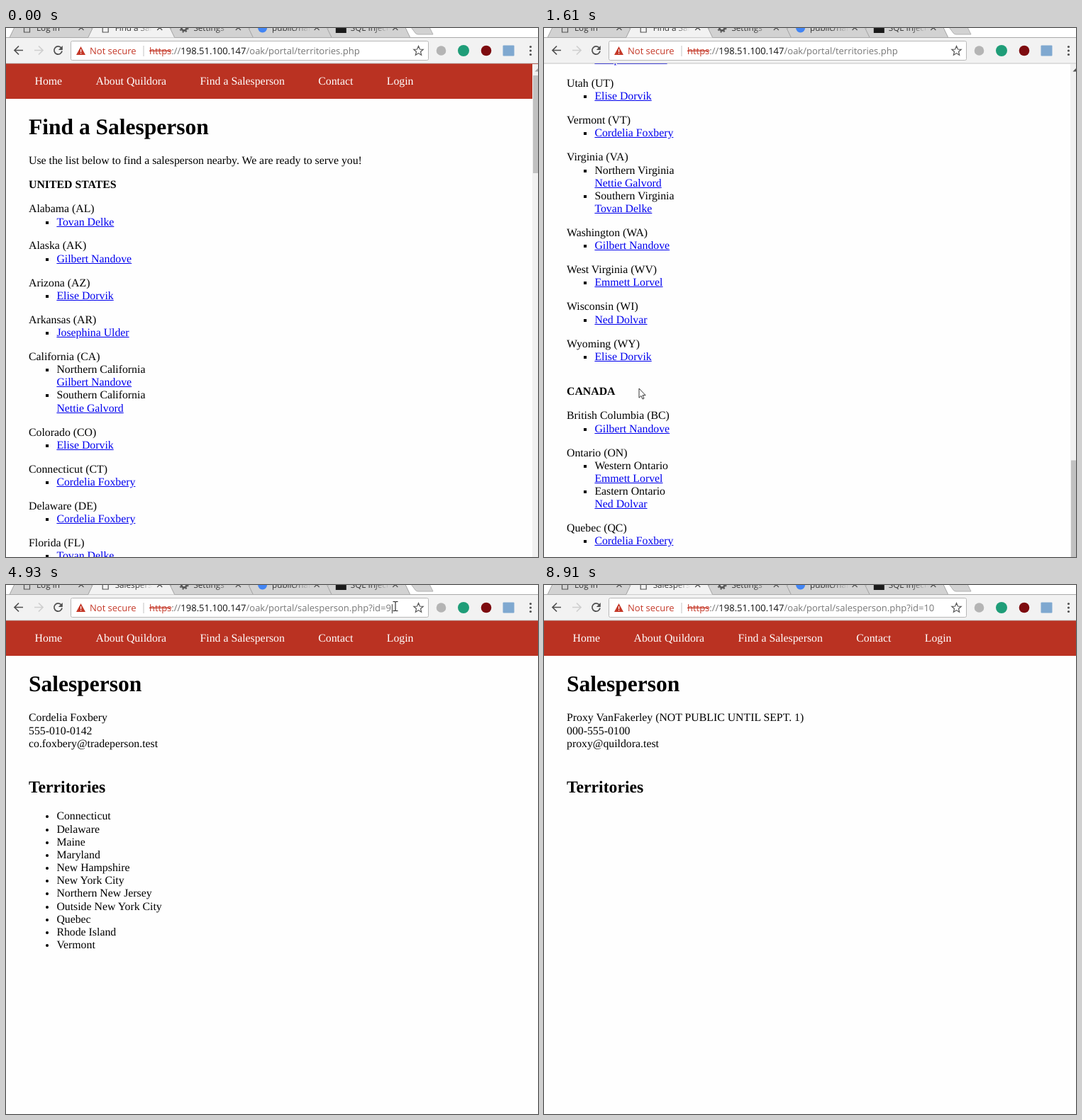
These frames come from a looping animation (750 by 747 pixels, 9310 ms). An HTML page:

```html
<!DOCTYPE html>
<html lang="en">
<head>
<meta charset="utf-8">
<title>Find a Salesperson</title>
<style>
  html, body { margin: 0; width: 100%; height: 100%; overflow: hidden; }
  body { background: #fefefe; text-rendering: geometricPrecision; }
  #view { position: absolute; top: 50px; left: 0; width: 750px; height: 697px; overflow: hidden;
          font: 15.8px/18.17px "Liberation Serif", serif; color: #000; }
  nav { display: flex; gap: 47.4px; height: 50px; padding-left: 40.5px; background: #ba3222;
        color: #fff; line-height: 52px; white-space: nowrap; }
  main { padding-left: 32px; }
  h1 { font-size: 31.5px; line-height: 36px; margin: 22px 0 21.4px; }
  h2 { font-size: 23.67px; line-height: 28px; margin: 37.6px 0 18.9px; }
  p { margin: 0 0 15.8px; }
  ul { margin: 0; padding-left: 39.4px; }
  .state { margin-bottom: 15.8px; }
  .state ul { list-style: square; }
  .canada { margin-top: 31.6px; }
  u { color: #00e; }
  svg { position: absolute; left: 0; top: 0; }
  svg text { font: 13px "Open Sans", sans-serif; white-space: pre; }
  svg .tab { font-size: 11.7px; fill: #333; }
  svg .bold { font-weight: 600; }
</style>
</head>
<body>
<div id="view"></div>
<svg id="overlay" width="750" height="747" viewBox="0 0 750 747"></svg>
<script>
const LOOP = 9310;
const HOST = '198.51.100.147', FOLDER = '/oak/portal/';
const BRAND = 'Quildora', SECRET = 'Proxy VanFakerley';
const PEOPLE = {
  T: 'Tovan Delke', G: 'Gilbert Nandove', E: 'Elise Dorvik', J: 'Josephina Ulder', N: 'Nettie Galvord',
  C: 'Cordelia Foxbery', P: 'Pam Ulveny', L: 'Emmett Lorvel', K: 'Ned Dolvar'
};
// name/code/territories; a territory is "place=people" or just people
const STATES = `Alabama/AL/T|Alaska/AK/G|Arizona/AZ/E|Arkansas/AR/J|California/CA/Northern California=G+Southern California=N
|Colorado/CO/E|Connecticut/CT/C|Delaware/DE/C|Florida/FL/T|Georgia/GA/T|Hawaii/HI/G|Idaho/ID/G
|Illinois/IL/Chicago=L+Outside Chicago=K|Indiana/IN/L|Iowa/IA/P|Kansas/KS/J|Kentucky/KY/L|Louisiana/LA/J|Maine/ME/C
|Maryland/MD/C|Massachusetts/MA/N|Michigan/MI/Western Michigan=K+Eastern Michigan=L|Minnesota/MN/P|Mississippi/MS/T
|Missouri/MO/J|Montana/MT/P|Nebraska/NE/P|Nevada/NV/Las Vegas=N+Outside Las Vegas=E|New Hampshire/NH/C
|New Jersey/NJ/Northern New Jersey=C+Southern New Jersey=N|New Mexico/NM/E
|New York/NY/New York City=CN+Outside New York City=C|North Carolina/NC/T|North Dakota/ND/P|Ohio/OH/L|Oklahoma/OK/J
|Oregon/OR/G|Pennsylvania/PA/Western Pennsylvania=L+Eastern Pennsylvania=N|Rhode Island/RI/C|South Carolina/SC/T
|South Dakota/SD/P|Tennessee/TN/T|Texas/TX/J|Utah/UT/E|Vermont/VT/C
|Virginia/VA/Northern Virginia=N+Southern Virginia=T|Washington/WA/G|West Virginia/WV/L|Wisconsin/WI/K|Wyoming/WY/E`;
const PROVINCES = 'British Columbia/BC/G|Ontario/ON/Western Ontario=L+Eastern Ontario=K|Quebec/QC/C';
const TERRITORIES = ['Connecticut', 'Delaware', 'Maine', 'Maryland', 'New Hampshire', 'New York City',
  'Northern New Jersey', 'Outside New York City', 'Quebec', 'Rhode Island', 'Vermont'];

// ---------- web pages ----------
const list = items => `<ul>${items.map(i => `<li>${i}</li>`).join('')}</ul>`;

function territory(text) {
  const [people, place] = text.split('=').reverse();
  const links = [...people].map(k => `<u>${PEOPLE[k]}</u>`);
  return (place ? [place, ...links] : links).join('<br>');
}
const regions = data => data.split('|').map(entry => {
  const [name, code, areas] = entry.trim().split('/');
  return `<div class="state">${name} (${code})${list(areas.split('+').map(territory))}</div>`;
}).join('');

const page = body => `<div><nav>${['Home', 'About ' + BRAND, 'Find a Salesperson', 'Contact', 'Login']
  .map(s => `<span>${s}</span>`).join('')}</nav><main>${body}</main></div>`;
const person = (lines, areas) =>
  page(`<h1>Salesperson</h1><p>${lines.join('<br>')}</p><h2>Territories</h2>${list(areas)}`);

const view = document.getElementById('view');
view.innerHTML =
  page(`<h1>Find a Salesperson</h1>
    <p>Use the list below to find a salesperson nearby. We are ready to serve you!</p>
    <p><b>UNITED STATES</b></p>${regions(STATES)}
    <p class="canada"><b>CANADA</b></p>${regions(PROVINCES)}`) +
  person([PEOPLE.C, '555-010-0142', 'co.foxbery@tradeperson.test'], TERRITORIES) +
  person([SECRET + ' (NOT PUBLIC UNTIL SEPT. 1)', '000-555-0100', 'proxy@quildora.test'], []);
const pages = [...view.children];

// ---------- motion ----------
function track(keys, t) {
  const i = keys.findIndex(k => k[0] > t);
  if (i < 0) return keys[keys.length - 1].slice(1);
  if (i === 0) return keys[0].slice(1);
  const a = keys[i - 1], b = keys[i], f = (t - a[0]) / (b[0] - a[0]);
  return a.slice(1).map((v, j) => v + (b[j + 1] - v) * f);
}
const recorded = t => Math.floor((t - 14) / 76) * 76 + 14;
const SCROLL = [[70, 0], [650, 620], [1230, 1827], [1600, 2819]];
const MOUSE = [[70, 690, 760], [600, 200, 392], [1000, 183, 380], [1300, 183, 380], [1610, 134, 509],
  [1920, 114, 640], [2210, 112, 725], [2850, 112, 725], [3490, 532, 52], [3700, 520, 40], [3880, 522, 37],
  [4000, 522, 37], [4400, 549, 30], [7000, 549, 30], [7130, 525, 42], [7450, 340, 150], [7700, 62, 190],
  [7900, 80, 272], [8160, 130, 192], [8350, 360, 205], [8820, 688, 760]];

// ---------- browser window ----------
const shape = (d, fill = 'none', stroke = 'none', w = 1) =>
  `<path d="${d}" fill="${fill}" stroke="${stroke}" stroke-width="${w}"/>`;
const rect = (x, y, w, h, fill, extra = '') =>
  `<rect x="${x}" y="${y}" width="${w}" height="${h}" fill="${fill}" ${extra}/>`;
const disc = (x, y, r, fill) => `<circle cx="${x}" cy="${y}" r="${r}" fill="${fill}"/>`;
const ring = (x, y, r, stroke, w, extra = '') =>
  `<circle cx="${x}" cy="${y}" r="${r}" fill="none" stroke="${stroke}" stroke-width="${w}" ${extra}/>`;
const text = (x, y, s, fill = '#000', cls = '') => `<text x="${x}" y="${y}" fill="${fill}" class="${cls}">${s}</text>`;
const span = (s, fill, extra = '') => `<tspan fill="${fill}" ${extra}>${s}</tspan>`;
const docIcon = (x, y, color) =>
  shape(`M${x - 4} ${y - 5.5}h5l3 3v8h-8zM${x + 1} ${y - 5.5}v3h3`, 'none', color, 1.2);
const gear = x => ring(x, 0, 3.6, '#555', 2.6) + ring(x, 0, 5.6, '#555', 1.8, 'stroke-dasharray="2.2 2.2"');

function star(x, y, r) {
  const points = Array.from({ length: 10 }, (_, i) => {
    const a = i * Math.PI / 5, k = i % 2 ? r * 0.45 : r;
    return `${(x + k * Math.sin(a)).toFixed(1)} ${(y - k * Math.cos(a)).toFixed(1)}`;
  });
  return shape(`M${points.join('L')}Z`, 'none', '#555', 1.2);
}

function tab(i, title, icon) {
  const x = 43 + 110.7 * i, active = i === 1, tone = active ? '#f2f2f2' : '#d2d2d2';
  return shape(`M${x - 38} 13.5L${x - 31}-1H${x + 77}L${x + 84} 13.5`, tone, '#a3a3a3') +
    text(x, 4.3, title, '#333', 'tab') +
    rect(x + 32, -1, 20, 10, `url(#fade${+active})`) + rect(x + 52, -1, 20, 10, tone) +
    icon(x - 13.5) +
    shape(`M${x + 59.5}-4l7 7m0-7l-7 7`, 'none', '#555', 1.3);
}

const fade = (id, color) => `<linearGradient id="${id}"><stop stop-color="${color}" stop-opacity="0"/>
  <stop offset="1" stop-color="${color}"/></linearGradient>`;
const DEFS = `<defs>${fade('fade0', '#d2d2d2')}${fade('fade1', '#f2f2f2')}
  <linearGradient id="shadow" x2="0" y2="1"><stop stop-opacity=".16"/><stop offset="1" stop-opacity="0"/></linearGradient></defs>`;

function tabs(t, loading) {
  const title = t < 2850 ? 'Find a Sale' : t >= 6260 && loading ? 'https://198' : 'Salesperson';
  const doc = x => docIcon(x, 0.5, '#555');
  const spinner = x => ring(x, 0, 5.7, '#4a86dc', 2,
    `stroke-dasharray="30 6" transform="rotate(${Math.round(t * 0.36) % 360} ${x} 0)"`);
  return rect(0, 0, 750, 14, '#fff') +
    shape('M571-1L577 7q1 2 4 2H602L597-1Z', '#d2d2d2', '#b0b0b0') +
    tab(4, 'SQL Injecti', x => rect(x - 7.5, -8, 15, 15, '#1a1a1a')) +
    tab(3, 'public/han', x => disc(x, 0, 6.5, '#4285f4')) +
    tab(2, 'Settings', gear) + tab(0, 'Log In', doc) +
    rect(0, 13, 750, 1, '#a9a9a9') + rect(0, 14, 750, 36, '#f2f2f2') + rect(0, 49.6, 750, 0.8, '#b4b4b4') +
    tab(1, title, loading ? spinner : doc);
}

function toolbar(loading) {
  const arrow = (x, dir, color) =>
    shape(`M${x - 6 * dir} 31.5h${12 * dir}M${x} 25.5l${6 * dir} 6l${-6 * dir} 6`, 'none', color, 1.7);
  return arrow(18, -1, '#505050') + arrow(46, 1, '#cfcfcf') +
    (loading ? shape('M68 26.5l10.5 10.5m0-10.5l-10.5 10.5', 'none', '#505050', 1.8)
      : shape('M78 28.2A5.6 5.6 0 1 0 79 32.5', 'none', '#505050', 1.7) + shape('M79.8 25v6h-6z', '#505050')) +
    rect(91.5, 18.5, 504, 27, '#fff', 'stroke="#b8b8b8" rx="2"') +
    disc(613.5, 32, 6.8, '#b4b4b4') + disc(645, 32, 8, '#1f9d78') + disc(677, 32, 7.3, '#7d0b0f') +
    rect(700.5, 24.5, 16, 15, '#7fa8d0', 'rx="1"') +
    [26.5, 32, 37.5].map(y => disc(739.5, y, 1.6, '#505050')).join('');
}

function addressBar(t, editing, file) {
  const selected = t >= 4550 && t < 4790, caret = t >= 4790 && t < 6260;
  const tone = c => selected ? '#fff' : c;
  const scheme = editing ? span('https://', '#777')
    : span('https', tone('#c53929'), 'text-decoration="line-through"') + span('://', tone('#777'));
  const url = scheme + span(HOST, tone('#111')) + span(FOLDER + file, tone('#777')) +
    (caret ? span('|', '#222', 'dx="-2"') : '');
  if (editing) return docIcon(105, 32, '#666') + text(118, 37, url);
  return shape('M105.5 26l6.5 12h-13z', '#c53929') + rect(105, 30, 1.2, 4, '#fff') + rect(105, 35, 1.2, 1.3, '#fff') +
    text(118, 37, 'Not secure', '#c53929') + rect(193.5, 25, 1, 15, '#c4c4c4') +
    (selected ? rect(201.5, 23, 344, 19, '#3390ff') : '') + text(202, 37, url) + star(581.5, 32.5, 7);
}

function suggestions(t, file) {
  const single = t >= 5950, bottom = single ? 84 : 133, base = `https://${HOST}${FOLDER}`;
  const entry = (y, cut, x, who, main, dash, label) => docIcon(105, y - 5, main) +
    text(117, y, base + cut, main, 'bold') + text(x, y, span('- ', dash) + span('Salesperson: ' + who, label));
  const hidden = SECRET.slice(0, 11) + '...';
  return rect(0, 50, 750, bottom - 50, '#fff') + rect(0, 50, 750, 0.8, '#c4c4c4') + rect(0, bottom, 750, 8, 'url(#shadow)') +
    rect(90, 52, 506, 25, '#0a78d7', 'rx="1"') +
    entry(69, 'salespers...', 425, single ? hidden : PEOPLE.T, '#fff', '#a9d0f2', '#fff') +
    (single ? '' : entry(93.5, 'salesper...', 417, hidden, '#2359c9', '#888', '#111') +
      ring(103, 112.5, 3.7, '#555', 1.5) + shape('M105.8 115.3l4 4', 'none', '#555', 1.8) +
      text(117, 118, base + file, '#222') + text(464, 118, '- Quarvo Search', '#888'));
}

function scrollbar(scroll) {
  const top = 67 + scroll / 3532 * 681;
  return rect(742, 51, 8, 696, '#f1f1f1') + rect(743, top, 7, 138, '#c1c1c1') +
    shape('M745.5 61.5l4.5-4.5v4.5z', scroll ? '#505050' : '#a3a3a3');
}

function pointer(t) {
  const [x, y] = track(MOUSE, recorded(t));
  let art = shape('M0 0V13.2L3 10.4L5 15L7 14.1L5 9.6H9.1Z', '#fff', '#222', 0.9);
  if (y < 48) art = shape('M-3.5-6.5H-1L0-5.7L1-6.5H3.5M0-5.7V5.7M-3.5 6.5H-1L0 5.7L1 6.5H3.5', 'none', '#222', 1.1);
  else if (t >= 2100 && t < 2850)
    art = shape('M-1.3 1a1.3 1.3 0 0 1 2.6 0V5.5Q7 5 7.5 8V12Q7 14 6 16.5H-.5Q-2 13-5 10Q-5 7.5-1.3 10Z', '#fff', '#222', 0.9);
  return `<g transform="translate(${x.toFixed(1)} ${y.toFixed(1)})">${art}</g>`;
}

// ---------- playback ----------
const overlay = document.getElementById('overlay');

function render(t) {
  const current = t < 2850 ? 0 : t < 7030 ? 1 : 2;
  const scroll = current ? 0 : Math.round(track(SCROLL, recorded(t))[0]);
  pages.forEach((p, i) => { p.hidden = i !== current; });
  pages[0].style.transform = `translateY(${-scroll}px)`;

  const loading = (t >= 2610 && t < 2850) || (t >= 6260 && t < 7030);
  const editing = t >= 5810 && t < 6260;
  const id = t < 5810 ? 9 : t < 5880 ? 1 : 10;
  const file = current ? 'salesperson.php?id=' + id : 'territories.php';
  overlay.innerHTML = DEFS + (current ? '' : scrollbar(scroll)) + tabs(t, loading) + toolbar(loading) +
    addressBar(t, editing, file) + (editing ? suggestions(t, file) : '') + pointer(t);
}

function frame() {
  render(performance.now() % LOOP);
  requestAnimationFrame(frame);
}
frame();
</script>
</body>
</html>
```
